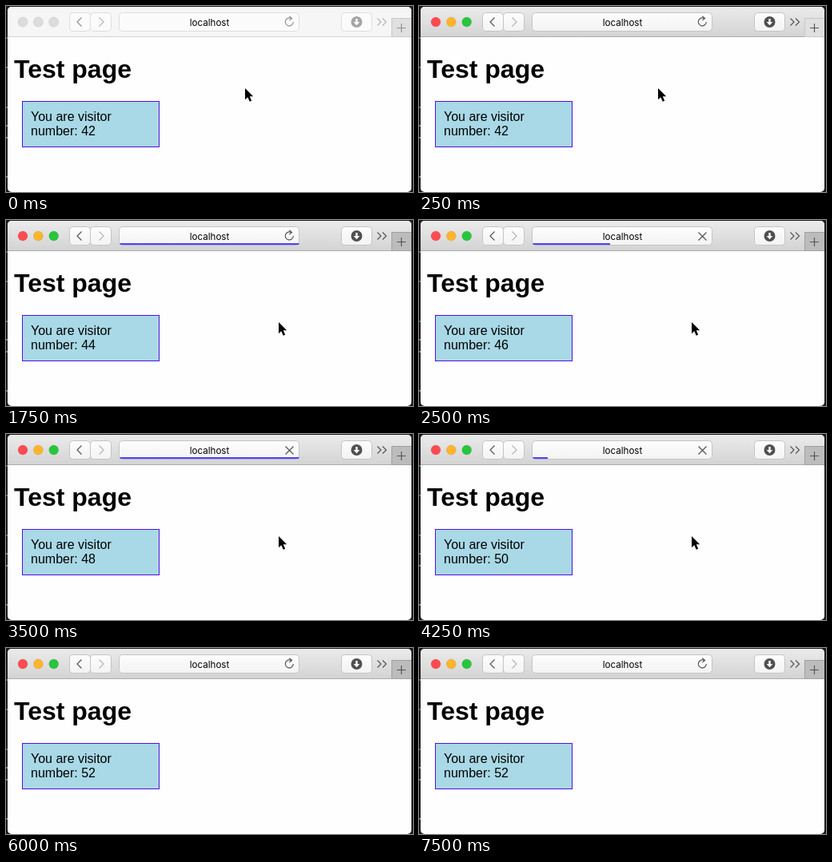
These frames come from a looping animation (509x233 px, 7750 ms). An HTML page:

```html
<!DOCTYPE html>
<html lang="en">
<head>
<meta charset="utf-8">
<title>Visitor counter</title>
<style>
  html, body { margin: 0; width: 100%; height: 100%; overflow: hidden; background: #1c1c1e; }
  svg { display: block; width: 509px; height: 233px; }
  text { font-family: "Liberation Sans", Arial, sans-serif; font-size: 16px; fill: #000; }
  .title { font-size: 32px; font-weight: bold; }
  .address { font: 11.6px Inter, sans-serif; text-anchor: middle; }
  .line { fill: none; stroke-width: 1.2; }
  .control { fill: url(#button); stroke: #c4c4c4; }
  .chrome { fill: url(#bar); }
  .edge { stroke: #acacac; }
  .ring { stroke: #0002; stroke-width: .6; }
  .red { fill: #ff4b50; }
  .amber { fill: #ffb52b; }
  .green { fill: #27c63d; }
  .icon { stroke: #555; }
  .dim { stroke: #b5b5b5; }
  .disc { fill: #505050; }
  .tab { fill: #bcbcbc; stroke: #a0a0a0; }
  .inactive .chrome { fill: #f6f6f6; }
  .inactive .edge { stroke: #d2d2d2; }
  .inactive .control { fill: #fbfbfb; stroke: #dedede; }
  .inactive .ring { fill: #dcdcdc; stroke: #c9c9c9; }
  .inactive .icon { stroke: #929292; }
  .inactive .faint { stroke: #b4b4b4; }
  .inactive .disc { fill: #a5a5a5; }
  .pale .tab { fill: #e0e0e0; stroke: #c8c8c8; }
</style>
</head>
<body>
<svg id="stage" viewBox="0 0 509 233">
  <defs>
    <linearGradient id="bar" x2="0" y2="1">
      <stop stop-color="#ebebeb"/><stop offset="1" stop-color="#d3d3d3"/>
    </linearGradient>
    <linearGradient id="button" x2="0" y2="1">
      <stop stop-color="#fdfdfd"/><stop offset="1" stop-color="#f3f3f3"/>
    </linearGradient>
    <clipPath id="window"><rect x="2" y="1" width="505" height="232" rx="5"/></clipPath>
    <clipPath id="field"><rect x="142" y="9" width="225" height="22.5" rx="3.5"/></clipPath>
  </defs>

  <rect width="509" height="233" fill="#1c1c1e"/>
  <path d="M0 40h2M0 77h2M0 127h2" stroke="#2f7a3c" stroke-width="2"/>
  <path d="M0 150h2M0 165h2M0 214h2" stroke="#777" stroke-width="2"/>

  <g clip-path="url(#window)">
    <rect x="2" y="1" width="505" height="232" fill="#fefefe"/>
    <rect class="chrome" x="2" y="1" width="505" height="38"/>
    <path class="edge" d="M2 38.5h505"/>
    <circle class="ring red" cx="21" cy="20" r="6"/>
    <circle class="ring amber" cx="40.3" cy="20" r="6"/>
    <circle class="ring green" cx="59.7" cy="20" r="6"/>

    <rect class="control" x="79.5" y="8.5" width="26" height="23" rx="4"/>
    <rect class="control" x="105.5" y="8.5" width="26" height="23" rx="4"/>
    <path class="line icon" d="M94.5 14.5l-5.5 5.5 5.5 5.5"/>
    <path class="line dim" d="M116.5 14.5l5.5 5.5-5.5 5.5"/>

    <rect class="control" x="141.5" y="8.5" width="225" height="23" rx="4"/>
    <g clip-path="url(#field)">
      <rect id="progress" x="142" y="29" width="0" height="2.3" fill="#4f46f5"/>
    </g>
    <text class="address" x="254.5" y="24.5">localhost</text>
    <g id="reload">
      <path class="line icon" d="M357 15.7A5 5 0 1 0 359.3 20"/>
      <path class="line icon" d="M354.3 12.8l3.2 2.7-3.2 2.6"/>
    </g>
    <path id="stop" class="line icon" d="M349.5 15.5l10 10m0-10l-10 10"/>

    <rect class="control" x="419.5" y="8.5" width="38" height="23" rx="4"/>
    <circle class="disc" cx="438.5" cy="20" r="7"/>
    <path d="M437.3 16h2.4v4h2.6l-3.8 4.3-3.8-4.3h2.6z" fill="#fff"/>
    <path class="line icon faint" d="M464.5 15.5l4.5 4.5-4.5 4.5m6.5-9l4.5 4.5-4.5 4.5"/>
    <rect class="tab" x="482.5" y="15.5" width="26" height="23"/>
    <path class="line icon" d="M489 27.5h11m-5.5-5.5v11"/>

    <text class="title" x="10" y="90">Test page</text>
    <rect x="20.5" y="119.5" width="171" height="57" fill="#a9d8e6" stroke="#5012dc"/>
    <text x="31" y="144">You are visitor</text>
    <text x="31" y="162">number: <tspan id="count">42</tspan></text>
  </g>

  <path id="cursor" d="M0 0v14.2l3.3-3 2.4 5.6 2.5-1.1-2.4-5.4h4.4z"
        fill="#000" stroke="#fff" stroke-width="1.6" paint-order="stroke"/>
</svg>
<script>
  const LOOP = 7750;
  const FULL = 225;
  const FADED = 0.35;
  const $ = id => document.getElementById(id);

  // Each page load: start time, then [delay, bar width, opacity] steps.
  const loads = [
    { at: 1250, bar: [[0, 0, 1], [250, 190, 1], [500, FULL, 1], [750, 0, 1]], done: 500 },
    { at: 2500, bar: [[0, 97, 1], [250, FULL, 1], [500, FULL, FADED]], done: 250 },
    ...[[3250, 17], [4250, 19], [5250, 22]].map(([at, width]) => ({
      at, bar: [[0, width, 1], [250, FULL, 1], [500, FULL, FADED], [750, 0, 1]], done: 500
    }))
  ];

  const pointer = [[0, 299, 103], [750, 341, 128], [5750, 494, 33], [6000, -50, -50]];

  const latest = (steps, t) => steps.filter(s => s[0] <= t).pop();
  const show = (id, on) => $(id).setAttribute('visibility', on ? 'visible' : 'hidden');

  function draw(t) {
    $('stage').classList.toggle('inactive', t < 250);
    $('stage').classList.toggle('pale', t < 500);

    const begun = loads.filter(l => l.at <= t);
    const load = begun[begun.length - 1];
    const [, width, opacity] = load ? latest(load.bar, t - load.at) : [0, 0, 1];
    const busy = !!load && t < load.at + load.done;
    $('progress').setAttribute('width', width);
    $('progress').setAttribute('opacity', opacity);
    show('stop', busy);
    show('reload', !busy);
    $('count').textContent = 42 + 2 * begun.length;

    const [, x, y] = latest(pointer, t);
    $('cursor').setAttribute('transform', `translate(${x} ${y})`);
  }

  function tick() {
    draw(performance.now() % LOOP);
    requestAnimationFrame(tick);
  }
  tick();
</script>
</body>
</html>
```
